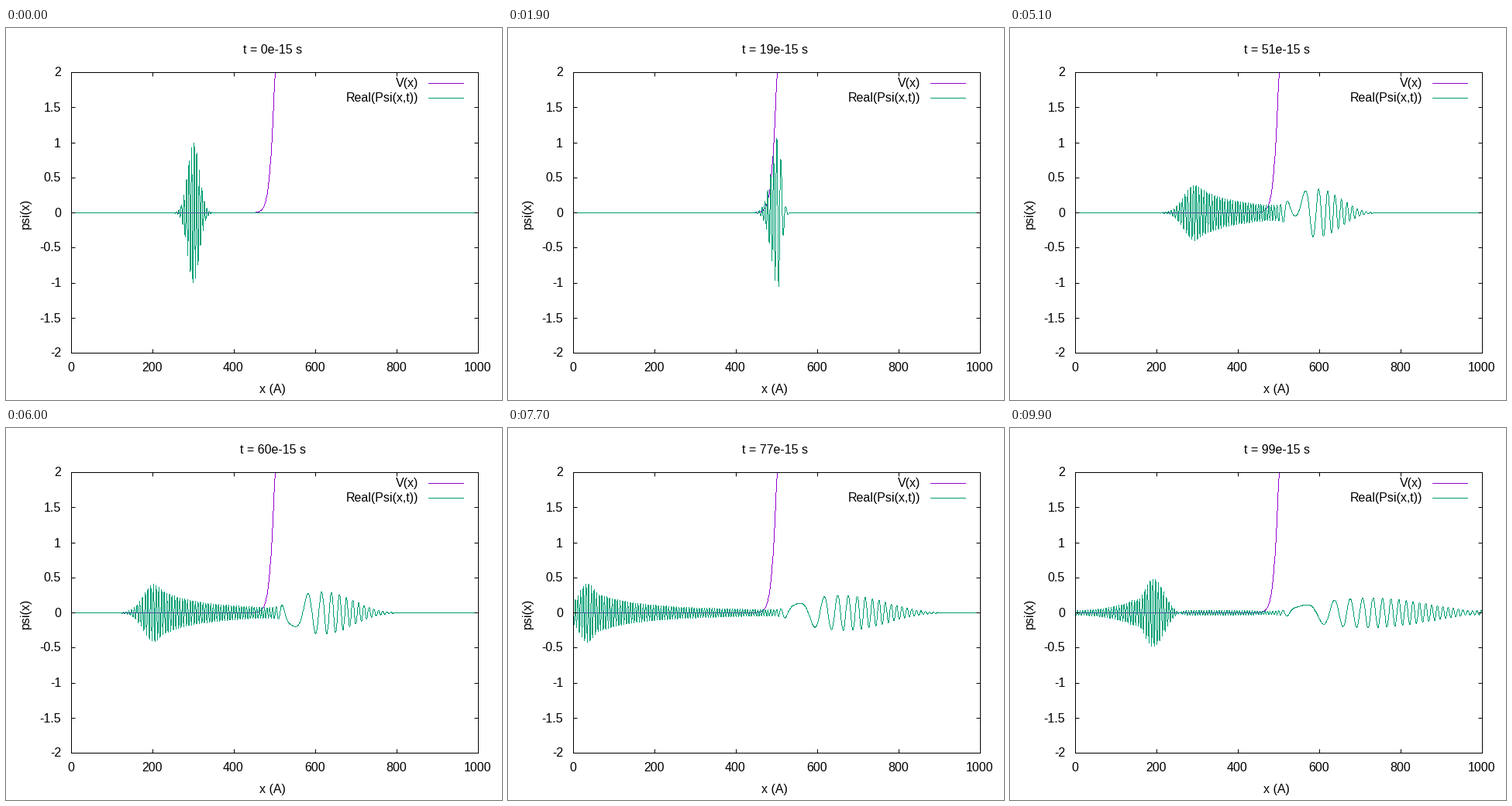
Write a matplotlib script that moves like this. It is 640x480 px and loops after 10 s.

```python
import numpy as np
import matplotlib
import matplotlib.pyplot as plt
from matplotlib.animation import FuncAnimation
from matplotlib.collections import LineCollection

matplotlib.rcParams["font.family"] = "Liberation Sans"

W, H, DPI = 640, 480, 100
PX = 72 / DPI
LEFT, RIGHT, TOP, BOTTOM = 84, 609, 57, 419
PURPLE, GREEN = "#9400d3", "#009e73"
FRAMES = 100

# Units: angstrom, femtosecond, electronvolt
HBAR = 0.658212
HBAR2_2M = 3.80998
LENGTH, DX, DT = 1000, 0.5, 0.1
MODES = 600
X = np.arange(0, LENGTH + DX / 2, DX)


def potential(x):
    return 3.88 / (1 + np.exp(-(x - 500) / 7.3))


def evolve():
    """Real part of a wave packet in a hard-walled box, once per femtosecond."""
    k = np.arange(1, MODES + 1) * np.pi / LENGTH
    basis = np.sin(np.outer(X, k))
    project = basis.T * (2 * DX / LENGTH)
    hamilton = np.diag(HBAR2_2M * k**2) + project @ (potential(X)[:, None] * basis)
    energy, vectors = np.linalg.eigh(hamilton)
    start = np.exp(-((X - 300) / 20) ** 2 + 1j * X)
    weights = vectors.T @ (project @ start)
    states = basis @ vectors
    # phase rate of Crank-Nicolson steps of length DT
    omega = 2 / DT * np.arctan(energy * DT / (2 * HBAR))
    times = np.arange(FRAMES)
    phases = np.exp(-1j * np.outer(omega, times))
    return (states @ (weights[:, None] * phases).real).T


def px(x):
    x = np.asarray(x)
    return np.floor(LEFT + x * (RIGHT - LEFT) / LENGTH + 0.5).astype(int)


def py(y):
    y = np.asarray(y)
    return np.floor(BOTTOM - (y + 2) * (BOTTOM - TOP) / 4 + 0.5).astype(int)


def columns(x, y):
    """One vertical stroke per pixel column, as an unsmoothed line covers it."""
    cx, cy = px(x), py(y)
    step = np.diff(cy)
    half = cy[:-1] + np.trunc(step / 2).astype(int)
    col = np.concatenate([cx, cx[:-1], cx[1:]]) - cx[0]
    row = np.concatenate([cy, half, half + np.sign(step)])
    lo = np.full(cx[-1] - cx[0] + 1, H)
    hi = np.zeros_like(lo)
    np.minimum.at(lo, col, row)
    np.maximum.at(hi, col, row)
    mid = np.arange(cx[0], cx[-1] + 1) + 0.5
    return np.stack([np.column_stack([mid, lo]),
                     np.column_stack([mid, hi + 1])], axis=1)


fig = plt.figure(figsize=(W / DPI, H / DPI), dpi=DPI, facecolor="white")
ax = fig.add_axes([0, 0, 1, 1])
ax.set_xlim(0, W)
ax.set_ylim(H, 0)
ax.axis("off")


def line(xs, ys, color="black", z=5):
    ax.plot(xs, ys, color=color, lw=PX, zorder=z, snap=False,
            solid_capstyle="butt", solid_joinstyle="miter")


def curve(segments, color, z):
    strokes = LineCollection(segments, colors=color, linewidths=PX, zorder=z)
    strokes.set_snap(False)
    return ax.add_collection(strokes, autolim=False)


def label(x, y, text, ha="center", **kw):
    return ax.text(x, y, text, ha=ha, va="baseline", fontsize=16 * PX,
                   color="black", **kw)


# Border, ticks and tick labels
L, R, T, B = LEFT + 0.5, RIGHT + 0.5, TOP + 0.5, BOTTOM + 0.5
for y in (T, B):
    line([LEFT, RIGHT + 1], [y, y])
for x in (L, R):
    line([x, x], [TOP, BOTTOM + 1])
for value in range(0, 1001, 200):
    x = px(value) + 0.5
    line([x, x], [B, B - 5])
    line([x, x], [T, T + 5])
    label(x - 1, 443, str(value))
for value in np.arange(-2, 2.1, 0.5):
    y = py(value) + 0.5
    line([L, L + 5], [y, y])
    line([R, R - 5], [y, y])
    label(71, y + 5, f"{value:g}", ha="right")

label(344, 471, "x (A)")
label(29.5, 239, "psi(x)", rotation=90, rotation_mode="anchor")
title = label(344.3, 33, "")

# Key
for y, text, color in ((71.5, "V(x)", PURPLE), (90.5, "Real(Psi(x,t))", GREEN)):
    label(532.5, y + 4.5, text, ha="right")
    line([545, 591], [y, y], color)

v = potential(X)
shown = np.count_nonzero(v < 2) + 1
curve(columns(X[:shown], np.minimum(v[:shown], 2)), PURPLE, 3)
waves = evolve()
wave = curve(columns(X, waves[0]), GREEN, 4)


def update(i):
    wave.set_segments(columns(X, waves[i]))
    title.set_text(f"t = {i}e-15 s")
    return wave, title


anim = FuncAnimation(fig, update, frames=FRAMES, interval=1000 // 10,
                     init_func=lambda: update(0), repeat=True, repeat_delay=0)
plt.show()
```
